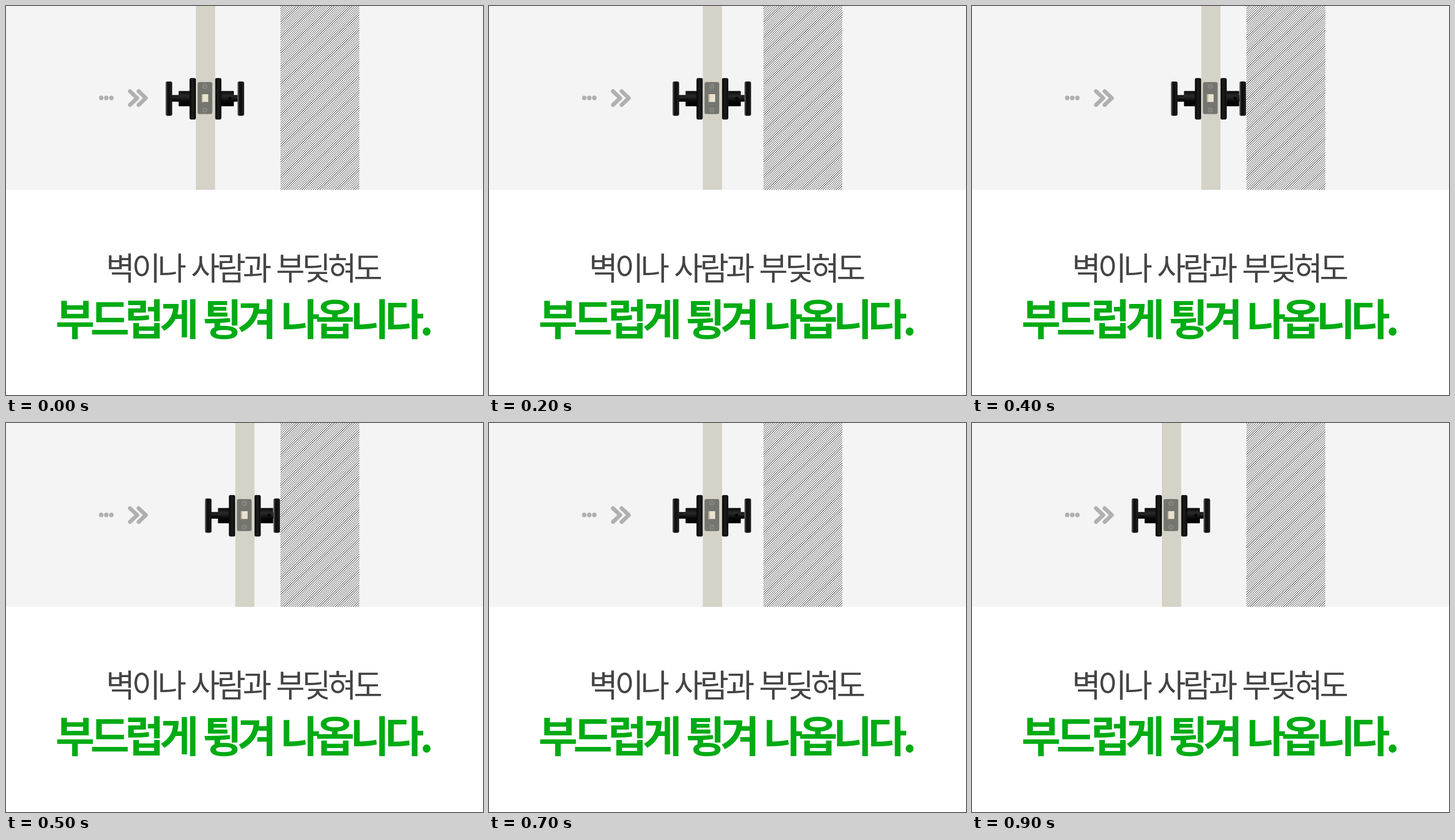
These frames come from a looping animation (829 by 675 pixels, 1.4 s). An HTML page with a canvas:

```html
<!DOCTYPE html>
<html lang="ko">
<head>
<meta charset="utf-8">
<style>
html, body { margin: 0; width: 100%; height: 100%; overflow: hidden; background: #fff; }
canvas { display: block; }
</style>
</head>
<body>
<canvas id="stage" width="829" height="675"></canvas>
<script>
const W = 829, H = 675, PANEL = 319;
const LOOP = 1400, STEP = 50, CONTACT = 300, PEAK = 450;
const ctx = document.getElementById('stage').getContext('2d');

function box(c, x, y, w, h, r, fill) {
  c.fillStyle = fill;
  c.beginPath();
  c.roundRect(x, y, w, h, r);
  c.fill();
}

function gradient(c, x0, y0, x1, y1, colors) {
  const g = c.createLinearGradient(x0, y0, x1, y1);
  colors.forEach((color, i) => g.addColorStop(i / (colors.length - 1), color));
  return g;
}

// Thin diagonals with a pitch just under 4px, which beat into soft bands.
function hatch(c, x0, y0, w, h) {
  c.fillStyle = '#111';
  for (let y = 0; y < h; y++) {
    for (let x = 0; x < w; x++) {
      const phase = x * 0.2582 + y * 0.2593;
      const dist = 3.87 * Math.abs(phase - Math.round(phase));
      c.globalAlpha = Math.max(0, 1 - 1.3 * dist);
      c.fillRect(x0 + x, y0 + y, 1, 1);
    }
  }
  c.globalAlpha = 1;
}

function arrows(c) {
  c.fillStyle = c.strokeStyle = '#b0b0b0';
  for (const x of [165.5, 174.3, 183.1]) {
    c.beginPath();
    c.arc(x, 159.5, 3.9, 0, 7);
    c.fill();
  }
  c.lineWidth = 7;
  c.lineCap = c.lineJoin = 'round';
  for (const x of [215.5, 230.5]) {
    c.beginPath();
    c.moveTo(x, 148);
    c.lineTo(x + 12.5, 159.8);
    c.lineTo(x, 171.6);
    c.stroke();
  }
}

function label(c, text, x, y, font, tracking, wordGap, color) {
  c.font = font + ' "Noto Sans CJK KR", "Noto Sans CJK", sans-serif';
  c.letterSpacing = tracking + 'px';
  c.wordSpacing = wordGap + 'px';
  c.fillStyle = color;
  c.fillText(text, x, y);
}

function makeBackdrop() {
  const layer = document.createElement('canvas');
  layer.width = W;
  layer.height = H;
  const c = layer.getContext('2d');
  c.fillStyle = '#fff';
  c.fillRect(0, 0, W, H);
  box(c, 0, 0, W, PANEL, 4, '#f4f4f4');
  hatch(c, 477, 0, 137, PANEL);
  arrows(c);
  label(c, '벽이나 사람과 부딪혀도', 173.7, 475, '300 54.5px', -5.2, 6, '#444');
  label(c, '부드럽게 튕겨 나옵니다.', 86, 571, '700 74px', -7.7, 5.5, '#00ab14');
  return layer;
}

function knob(x) {
  box(ctx, x, 131, 11.5, 59.5, 3, gradient(ctx, x, 0, x + 12, 0, ['#777', '#161616', '#0c0c0c', '#1c1c1c', '#111']));
}

function flange(x) {
  box(ctx, x, 125, 11, 72, 3, gradient(ctx, x, 0, x + 11, 0, ['#050505', '#1d1d1d', '#080808']));
}

function bar(x, y, w, h) {
  box(ctx, x, y, w, h, 1, gradient(ctx, 0, y, 0, y + h, ['#0a0a0a', '#2a2a2a', '#080808', '#000']));
}

function lockPlate(x) {
  box(ctx, x, 132, 25.5, 55.5, 3, '#757570');
  ctx.strokeStyle = '#a2a19b';
  ctx.lineWidth = 0.9;
  for (const y of [139.5, 180.5]) {
    ctx.beginPath();
    ctx.arc(x + 12.7, y, 3.6, 0, 7);
    ctx.moveTo(x + 11.5, y + 1);
    ctx.lineTo(x + 14, y - 1);
    ctx.stroke();
  }
  box(ctx, x + 7, 153, 11.5, 13.5, 0, '#e9e2cf');
  box(ctx, x + 7, 153, 2, 13.5, 0, '#bdb49d');
}

function drawDoor(push, squeeze) {
  const x = push + squeeze;
  bar(x + 288, 154.5, 14, 11.5);
  bar(x + 300, 147.5, 20, 26.5);
  bar(x + 390, 154.5, 13 - squeeze, 11.5);
  bar(x + 374, 147.5, 22, 26.5);
  ctx.fillStyle = '#000';
  ctx.beginPath();
  ctx.arc(x + 389, 160, 2.5, 0, 7);
  ctx.fill();
  knob(x + 277.3);
  knob(push + 402.3);
  flange(x + 319);
  flange(x + 363.3);
  box(ctx, x + 330, 0, 33.5, PANEL, 0, '#d5d3c7');
  lockPlate(x + 333);
}

const backdrop = makeBackdrop();

function render(now) {
  const t = Math.floor((now % LOOP) / STEP) * STEP;
  // Out and back mirror each other around the peak.
  const rise = Math.max(0, PEAK - Math.abs(t - PEAK));
  const push = 62.4 * Math.min(1, rise / CONTACT);
  const squeeze = 3 * Math.max(0, rise - CONTACT) / STEP;
  ctx.drawImage(backdrop, 0, 0);
  drawDoor(push, squeeze);
  requestAnimationFrame(render);
}
requestAnimationFrame(render);
</script>
</body>
</html>
```
